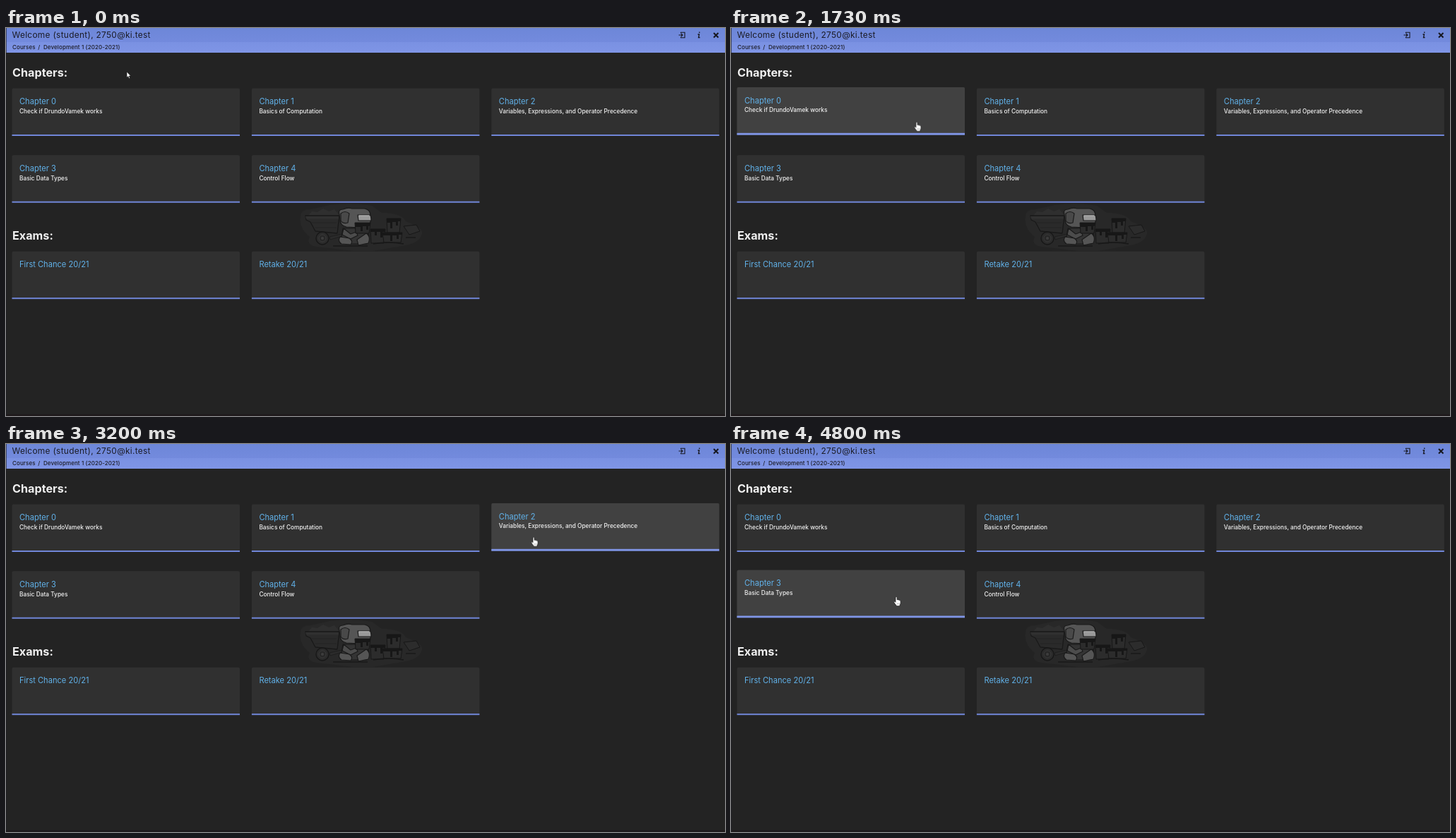
These frames come from a looping animation (1018x550 px, 5.47 s). An HTML page:

```html
<!DOCTYPE html>
<html lang="en">
<head>
<meta charset="utf-8">
<title>Course chapters</title>
<style>
html, body { margin: 0; width: 100%; height: 100%; overflow: hidden; background: #232323; }
svg { display: block; position: absolute; left: 0; top: 0; }
text { font-family: Inter, "Open Sans", sans-serif; }

.bar { font-size: 11.9px; letter-spacing: .3px; fill: #1b1c26; }
.crumb { font-size: 8px; font-weight: 500; letter-spacing: .1px; fill: #1b1c26; }
.head { font-size: 16.2px; font-weight: 700; fill: #efefef; }
.name { font-size: 11.1px; fill: #61b2ea; }
.info { font-size: 8.3px; font-weight: 500; fill: #f2f2f2; }

.card { --h: 0; transform: translateY(calc(var(--h) * -1.5px)); }
.lit { opacity: var(--h); }
.card, .cursor { animation: 5470ms step-end infinite; }
.c0 { animation-name: c0; }
.c1 { animation-name: c1; }
.c2 { animation-name: c2; }
.c3 { animation-name: c3; }
.c4 { animation-name: c4; }
@keyframes c0 { 0% { --h: 0 } 18.18% { --h: .5 } 19.4% { --h: 1 } 36.47% { --h: .5 } 37.69%, 100% { --h: 0 } }
@keyframes c1 { 0% { --h: 0 } 37.69% { --h: .5 } 38.9% { --h: 1 } 54.75% { --h: .5 } 55.97%, 100% { --h: 0 } }
@keyframes c2 { 0% { --h: 0 } 54.75% { --h: .5 } 55.97% { --h: 1 } 60.84% { --h: .5 } 62.06%, 100% { --h: 0 } }
@keyframes c4 { 0% { --h: 0 } 64.5% { --h: .5 } 65.72% { --h: 1 } 82.78% { --h: .5 } 84%, 100% { --h: 0 } }
@keyframes c3 { 0% { --h: 0 } 82.78% { --h: .5 } 84%, 100% { --h: 1 } }

.cursor { --hand: 0; animation-name: move, shape; }
.hand { opacity: var(--hand); }
.arrow { opacity: calc(1 - var(--hand)); }
/* the pointer is sampled 15 times a second */
@keyframes move {
  0%, 13.31% { transform: translate(171px, 62px); animation-timing-function: steps(6); }
  20.62% { transform: translate(168px, 103px); animation-timing-function: steps(3); }
  24.28% { transform: translate(164.5px, 127px); animation-timing-function: steps(9); }
  35.25% { transform: translate(312px, 137px); animation-timing-function: steps(3); }
  38.9% { transform: translate(404.5px, 118px); animation-timing-function: steps(12); }
  53.53% { transform: translate(677.7px, 130px); animation-timing-function: steps(4); }
  58.4% { transform: translate(747px, 132.5px); animation-timing-function: steps(9); }
  69.37% { transform: translate(581.5px, 217px); animation-timing-function: steps(15); }
  87.66%, 100% { transform: translate(234px, 217px); }
}
@keyframes shape {
  0%, 36.47%, 53.53%, 60.84% { --hand: 0 }
  18.18%, 37.69%, 54.75%, 64.5%, 100% { --hand: 1 }
}
</style>
</head>
<body>
<svg width="1018" height="550" viewBox="0 0 1018 550">
  <defs>
    <linearGradient id="sky" x2="0" y2="1">
      <stop offset="0" stop-color="#6d87d8"/>
      <stop offset=".56" stop-color="#738add"/>
      <stop offset=".58" stop-color="#7a91e2"/>
      <stop offset="1" stop-color="#7f95e6"/>
    </linearGradient>
    <g id="box">
      <path d="M0 67V2q0-2 2-2H320.5q2 0 2 2V67z" fill="#303030"/>
      <rect y="65.5" width="322.5" height="2" fill="#7086d8"/>
    </g>
    <g id="glow">
      <path d="M0 67V2q0-2 2-2H320.5q2 0 2 2V67z" fill="#414141"/>
      <rect y="64.8" width="322.5" height="2.7" fill="#8095e6"/>
    </g>
  </defs>

  <rect width="1018" height="550" fill="#232323"/>
  <rect y="547.5" width="1018" height="2.5" fill="#1f1a1c"/>
  <rect width="1018" height="35" fill="url(#sky)"/>
  <rect width="1" height="550" fill="#1c1c20" opacity=".6"/>

  <text class="bar" x="8.5" y="14">Welcome (student), 2750@ki.test</text>
  <text class="crumb" x="9" y="30.3">Courses</text>
  <text class="crumb" x="45.3" y="30.3">/</text>
  <text class="crumb" x="53" y="30.3">Development 1 (2020-2021)</text>

  <g fill="none" stroke="#16171f">
    <path d="M955.5 7.5V6.2H961V13.8H955.5V12.500M952.5 10H958M956 8l2 2-2 2" stroke-width="1.1"/>
    <path d="M979.5 9H981.5L980.5 13.5H982.5" stroke-width="1.3"/>
    <path d="M981.7 5.5V7" stroke-width="1.5"/>
    <path d="M1002 7l6.5 6.5M1008.5 7l-6.5 6.5" stroke-width="2"/>
  </g>

  <text class="head" x="9" y="68.5">Chapters:</text>
  <text class="head" x="9" y="299.8">Exams:</text>

  <g id="scene" stroke-linejoin="round">
    <path d="M417 266Q418 257 432 257L458 251Q490 247 518 252L532 262Q560 262 566 274Q592 284 589 292Q586 304 566 308L520 316H492L440 310Q424 308 430 296Q414 284 417 266z" fill="#282828"/>
    <path d="M427 267l6-7 8 1 8-5 8 4 8-3 8 10z" fill="#2f2f2f"/>
    <path d="M424 266h48l-3 25-31-3-7-13-6-3z" fill="#2a2a2a" stroke="#191919" stroke-width="1.3"/>
    <path d="M424 267h47v3.5h-46z" fill="#303030"/>
    <path d="M432 276h36M438 283h30" stroke="#222" fill="none"/>
    <circle cx="448" cy="298" r="9" fill="#2b2b2b" stroke="#181818" stroke-width="1.4"/>
    <circle cx="448" cy="298" r="5" fill="#272727" stroke="#3a3a3a"/>
    <circle cx="448" cy="298" r="2" fill="#3e3e3e"/>
    <path d="M458 296l18-4v3l-17 5z" fill="#2b2b2b" stroke="#1b1b1b" stroke-width=".7"/>
    <g stroke="#1a1a1a" stroke-width="1.2">
      <path d="M477 284h30l7 10-3 12h-33l-3-10z" fill="#343434"/>
      <path d="M472 264Q470 257 477 257Q484 254 490 256H507Q516 257 516 266V275Q512 283 502 283L482 282Q473 280 473 272z" fill="#555"/>
      <path d="M474 263q6-5 12 0l-2 13q-7 2-10-3z" fill="#494949"/>
      <path d="M498 265h17q2 1 2 8h-18z" fill="#999"/>
      <path d="M473 296q-4 6 2 10l13 1q4-5-2-9zM497 300l13-9q7 5 3 14l-14 3z" fill="#555"/>
      <path d="M478 284l10 8 8-3 2 5-10 5-12-6z" fill="#4c4c4c"/>
    </g>
    <path d="M500 266h14" stroke="#bcbcbc"/>
    <g fill="#2c2c2c" stroke="#171717">
      <path d="M494 276h22l-2 15h-19z"/>
      <path d="M516 285h21l-2 20h-18z"/>
      <path d="M539 270h20l-2 20h-17z"/>
      <path d="M533 290h28l-2 14h-24z"/>
      <path d="M563 281l18-2 5 9-15 5z"/>
    </g>
    <path d="M494 276h22v4l-3 1v5h-3v-5h-5v7h-3v-6h-7zM516 285h21v4h-4v8h-3v-8h-5v5h-3v-5h-6zM539 270h20v4h-4v6h-3v-5h-5v9h-3v-8h-5zM533 290h28v3h-5v6h-3v-5h-6v8h-3v-8h-11z" fill="#171717"/>
    <path d="M520 306q20-4 43 0M566 297h14M463 309h49" stroke="#181818" stroke-width="1.6" fill="none"/>
  </g>

  <g id="cards"></g>

  <g class="cursor">
    <path class="arrow" d="M0 0V8.3L1.9 6.6 3.2 9.5 4.5 8.9 3.2 6.1H5.7z" fill="#fff" stroke="#111" stroke-width=".6"/>
    <g class="hand" transform="translate(0 -1)">
      <path d="M-1 1.2Q0-.3 1.1 1.2V4.8Q2.1 4 2.9 5.1 3.9 4.6 4.5 5.6 6 5.3 6.1 6.8V10Q5.7 11.5 5 12.2V13.7H-.1V12.6Q-2.3 10.5-3.4 8.1-3.3 6.7-1.9 7.3L-1 8.3z" fill="#fff" stroke="#151515" stroke-width=".7"/>
      <path d="M1.3 9.5v2M2.8 9.5v2M4.3 9.5v2" stroke="#777" stroke-width=".5"/>
    </g>
  </g>
</svg>
<script>
const cards = [
  ["Chapter 0", "Check if DrundoVamek works", 0, 85.5],
  ["Chapter 1", "Basics of Computation", 1, 85.5],
  ["Chapter 2", "Variables, Expressions, and Operator Precedence", 2, 85.5],
  ["Chapter 3", "Basic Data Types", 0, 180.2],
  ["Chapter 4", "Control Flow", 1, 180.2],
  ["First Chance 20/21", "", 0, 316.7],
  ["Retake 20/21", "", 1, 316.7]
];
document.getElementById("cards").innerHTML = cards.map(([name, info, col, y], i) => `
  <g transform="translate(${8.5 + col * 339.4} ${y})">
    <g class="card c${i}">
      <use href="#box"/><use class="lit" href="#glow"/>
      <text class="name" x="10.5" y="22.6">${name}</text>
      <text class="info" x="10.5" y="35.4">${info}</text>
    </g>
  </g>`).join("");
</script>
</body>
</html>
```
